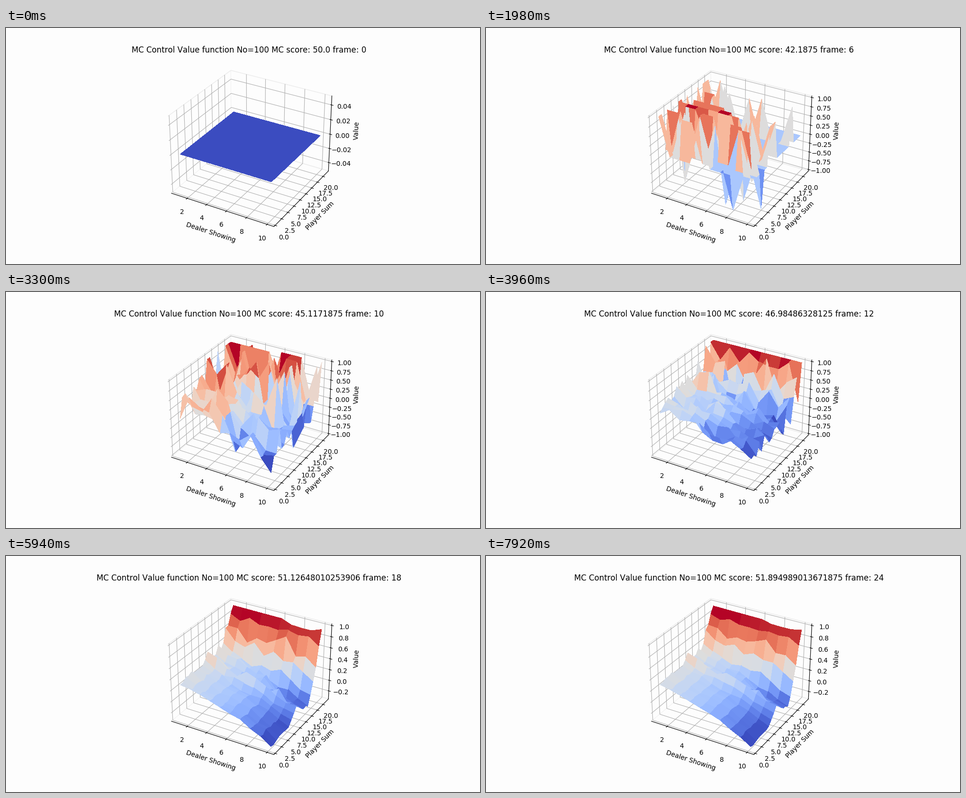
A matplotlib script that plays this animation: 1000 by 500 pixels, repeating every 8000 ms.

```python
import random

import numpy as np
import matplotlib.pyplot as plt
from matplotlib.animation import FuncAnimation

plt.rcParams["text.kerning_factor"] = 6

LOOP, TICK, STEP = 8000, 50, 330
LAST = (LOOP - 1) // STEP
DOUBLING = 15        # games double up to this stage, then grow evenly
BATCH = 2 ** (DOUBLING + 1)
EXPLORE = 100
PAPER = "#fdfdfd"
DEALER, PLAYER = np.meshgrid(np.arange(1, 11), np.arange(1, 22))

# games won at a few stages; the win rate runs straight between them
KEY_WINS = {0: 1, 4: 13, 6: 54, 10: 924, 12: 3849, 15: 33080, 21: 237526,
            24: 340099}


def games_at(n):
    return 2 ** (n + 1) if n <= DOUBLING else (n - DOUBLING + 1) * BATCH


def best_values():
    """Exact values of the card game by dynamic programming; total 0 is bust."""
    draw = np.zeros((22, 22))
    draw[0, 0] = 1
    for total in range(1, 22):
        for card in range(1, 11):
            for step, chance in ((card, 2 / 30), (-card, 1 / 30)):
                after = total + step
                draw[total, after if 1 <= after <= 21 else 0] += chance
    dealer = draw.copy()
    dealer[17:] = np.eye(22)[17:]
    ends = np.linalg.matrix_power(dealer, 200)[1:11]
    totals = np.arange(22)
    stick = np.sign(totals[:, None] - totals) @ ends.T
    stick[0] = -1
    value = stick.copy()
    for _ in range(200):
        value = np.maximum(stick, draw @ value)
        value[0] = -1
    return value[1:]


def learned_values():
    """Value surface of a Monte Carlo player after each doubling of games."""
    rand = random.Random(21).random
    q = [[[0.0, 0.0] for _ in range(11)] for _ in range(22)]
    visits = [[[0, 0] for _ in range(11)] for _ in range(22)]

    def draw():
        card = int(rand() * 10) + 1
        return card if rand() < 2 / 3 else -card

    def play():
        dealer, player = int(rand() * 10) + 1, int(rand() * 10) + 1
        shown, path = dealer, []
        while True:
            count, guess = visits[player][shown], q[player][shown]
            if rand() < EXPLORE / (EXPLORE + count[0] + count[1]):
                hit = int(rand() * 2)
            else:
                hit = int(guess[1] > guess[0])
            path.append((count, guess, hit))
            if not hit:
                break
            player += draw()
            if not 1 <= player <= 21:
                return path, -1
        while 1 <= dealer < 17:
            dealer += draw()
        if not 1 <= dealer <= 21:
            return path, 1
        return path, (player > dealer) - (player < dealer)

    surfaces, played = [], 0
    for n in range(DOUBLING + 1):
        while played < games_at(n):
            path, reward = play()
            played += 1
            for count, guess, hit in path:
                count[hit] += 1
                guess[hit] += (reward - guess[hit]) / count[hit]
        surfaces.append(np.array(q).max(axis=2)[1:, 1:])
    return surfaces


def all_surfaces():
    surfaces, best = learned_values(), best_values()
    surfaces[0] = np.zeros_like(best)
    surfaces[2] = surfaces[1]
    error = surfaces[DOUBLING] - best
    for n in range(DOUBLING + 1, LAST + 1):
        surfaces.append(best + error * np.sqrt(BATCH / games_at(n)))
    return surfaces


def z_range(n, z):
    if n == 0:
        return -.05, .05
    return (-1 if 4 <= n <= 12 else z.min()), 1


def title(n):
    rates = [wins / games_at(k) for k, wins in KEY_WINS.items()]
    wins = int(np.interp(n, list(KEY_WINS), rates) * games_at(n) + .5)
    score = wins / games_at(n) * 100
    return f"MC Control Value function No=100 MC score: {score} frame: {n}"


SURFACES = all_surfaces()

fig = plt.figure(figsize=(10, 5), dpi=100, facecolor=PAPER)
ax = fig.add_subplot(111, projection="3d", facecolor=PAPER)
ax.set_xlabel("Dealer Showing")
ax.set_ylabel("Player Sum")
ax.set_zlabel("Value")
for axis in (ax.xaxis, ax.yaxis, ax.zaxis):
    axis.set_pane_color(PAPER)
    axis.pane.set_edgecolor("#ebebeb")

shown = {"stage": None, "surface": None}


def update(k):
    n = (k * TICK + TICK - 1) // STEP
    if n == shown["stage"]:
        return []
    if shown["surface"] is not None:
        shown["surface"].remove()
    z = SURFACES[n]
    shown["surface"] = ax.plot_surface(DEALER, PLAYER, z, rstride=1, cstride=1,
                                       cmap="coolwarm", linewidth=0,
                                       antialiased=False)
    shown["stage"] = n
    low, high = z_range(n, z)
    pad = (high - low) / 48
    ax.set_xlim(.34375, 10.65625)
    ax.set_ylim(-.4583, 22.4583)
    ax.set_zlim(low - pad, high + pad)
    ax.set_title(title(n))
    return []


anim = FuncAnimation(fig, update, frames=LOOP // TICK, interval=TICK,
                     repeat=True, repeat_delay=0)
plt.show()
```
